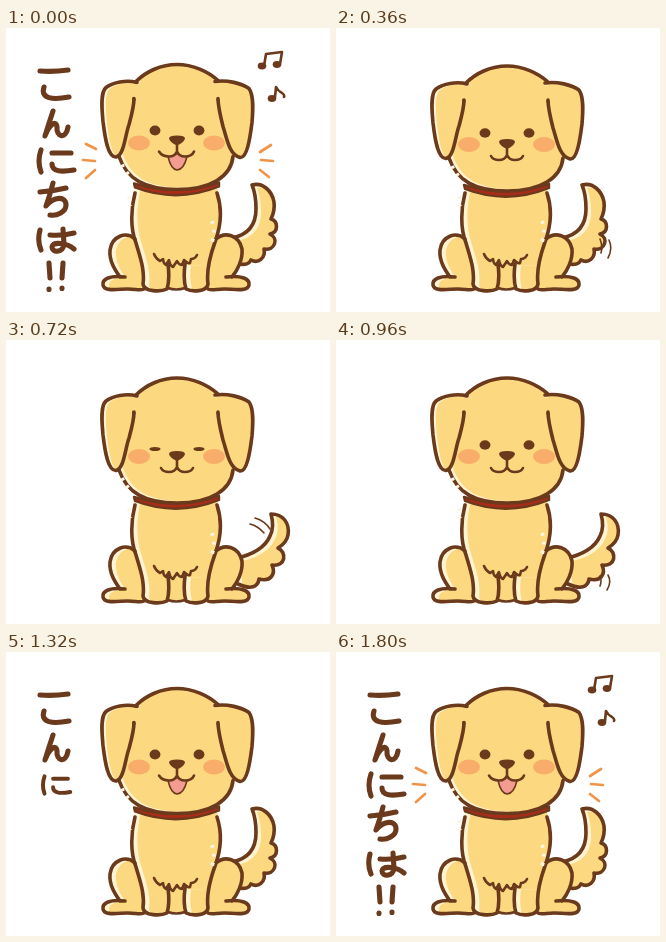
An HTML page for the animation above (1920 ms loop, 324x284 px).

```html
<!DOCTYPE html>
<html lang="ja">
<head>
<meta charset="utf-8">
<title>こんにちは</title>
<style>
html, body { margin: 0; width: 100%; height: 100%; overflow: hidden; background: #fff; }
svg { display: block; width: 100vw; height: 100vh; }
.ink { fill: none; stroke: #6b3a1c; stroke-width: 3.6; stroke-linecap: round; stroke-linejoin: round; }
.thin { stroke-width: 1.6; }
.mouth { stroke-width: 2.6; }
.letter { stroke-width: 5.1; }
.dot { fill: #6b3a1c; }
.cheek { fill: #f8ae6a; }
.gap { fill: none; stroke: #fff6df; stroke-width: 3.8; stroke-dasharray: 3 6; }
.ray { fill: none; stroke: #f0944a; stroke-width: 2.7; stroke-linecap: round; }
</style>
</head>
<body>
<svg id="stage" viewBox="0 0 324 284">
  <defs>
    <filter id="rough" filterUnits="userSpaceOnUse" x="0" y="0" width="324" height="284" color-interpolation-filters="sRGB">
      <feTurbulence type="fractalNoise" baseFrequency="0.25" numOctaves="1" seed="4"/>
      <feDisplacementMap in="SourceGraphic" scale="1.5" xChannelSelector="R" yChannelSelector="G"/>
    </filter>
  </defs>
  <g id="art" filter="url(#rough)"></g>
</svg>
<script>
const NS = 'http://www.w3.org/2000/svg';
const STEP = 120, STEPS = 16;
const art = document.getElementById('art');
const defs = document.querySelector('defs');
let clips = 0;

function add(parent, tag, attrs = {}) {
  const el = document.createElementNS(NS, tag);
  for (const key in attrs) el.setAttribute(key, attrs[key]);
  parent.appendChild(el);
  return el;
}
const group = (parent = art) => add(parent, 'g');
const line = (parent, d, cls = 'ink') => add(parent, 'path', { d, class: cls });
const oval = (parent, cx, cy, rx, ry, cls = 'dot') => add(parent, 'ellipse', { cx, cy, rx, ry, class: cls });
const show = (el, on) => el.setAttribute('display', on ? 'inline' : 'none');

// Yellow area, slid right so a pale rim stays on its left side
function fur(parent, d, dx = 4, dy = 1) {
  const id = 'clip' + clips++;
  add(add(defs, 'clipPath', { id }), 'path', { d });
  add(parent, 'path', { d, fill: '#fff3d2' });
  const inner = add(parent, 'g', { 'clip-path': `url(#${id})` });
  add(inner, 'path', { d, fill: '#fcd980', transform: `translate(${dx} ${dy})` });
}

// Tail
const tailUp = 'M226 210C241 207 250 198 250 181C250 172 249 164 246 157C257 154 266 163 268 174C269 182 267 187 265 191C272 193 273 204 264 206C273 210 269 223 258 221C260 230 252 236 245 232C243 236 240 237 232 236';
const tailOut = 'M228 219C246 215 259 208 264 196C268 188 267 181 265 174C277 174 284 183 282 195C281 201 277 205 272 208C281 212 280 227 266 225C270 234 265 242 253 239C252 247 245 250 232 244';
function tail(d, turn = 0) {
  const g = group();
  fur(g, d, 5, 3);
  line(g, d);
  if (turn) g.setAttribute('transform', `rotate(${turn} 232 230)`);
  return g;
}
const tails = [tail(tailUp), tail(tailOut), tail(tailOut, 17)];

const swishes = {
  up: 'M264 211Q267 218 265 225M273 212Q277 221 272 230',
  out: 'M244 184Q252 186 258 193M249 178Q259 181 264 189',
  back: 'M264 236Q266 241 264 246M272 235Q276 242 271 250'
};
for (const key in swishes) swishes[key] = line(art, swishes[key], 'ink thin');

// Body
const body = group();
fur(body, 'M129 212C120 203 106 208 104 222C103 233 109 242 114 249C102 248 96 252 97 258C98 264 112 261 122 261C130 261 136 263 142 261L140 225Z', 6, 1);
fur(body, 'M209 212C219 203 233 207 236 221C237 232 231 243 226 249C238 248 244 252 243 257C242 264 228 261 218 261C210 261 204 263 198 261L202 225Z', 0, 1);
fur(body, 'M129 160C124 180 124 200 130 217C134 230 139 244 137 257C138 265 156 264 162 260L179 260C185 264 199 265 202 257C201 244 205 230 209 217C215 198 215 180 211 160Z', 6, 0);
fur(body, 'M179 237Q177 252 180 261C186 264 200 264 201 256L201 238Z', 6, 0);
line(body, 'M129 211C120 203 106 208 104 222C103 233 109 242 114 249M119 249C104 247 96 251 97 257C98 264 112 261 122 261C130 261 134 263 138 261');
line(body, 'M210 211C219 203 233 207 236 221C237 232 231 243 226 249M220 249C236 247 244 251 243 257C242 264 228 261 218 261C210 261 206 263 202 261');
line(body, 'M129 165C125 180 124 200 130 215C134 229 139 242 137 256C138 264 155 264 161 261Q164 252 162 236');
line(body, 'M211 165C216 180 215 198 209 214C204 228 200 242 202 256C201 264 186 264 180 261Q177 252 179 236');
line(body, 'M162 260Q170 263 179 260', 'ink mouth');
line(body, 'M148 226Q150 231 154 233L157 231Q157 235 160 237L163 232Q164 238 167 239L171 233Q173 237 176 237L178 232Q182 236 184 235L185 231Q189 231 191 227', 'ink mouth');
line(body, 'M206 193Q210 202 206 214M123 168L124 178', 'gap');

// Head
const head = group();
line(head, 'M128 157Q171 170 213 156L213 160Q171 177 129 161Z').setAttribute('style', 'fill:#a82c1a;stroke-width:2.4');
fur(head, 'M130 55C140 45 155 38 171 38C187 38 202 45 212 54L228 128C226 150 205 163 171 163C139 163 121 153 113 130Z', 4, -2);
line(head, 'M130 55C140 45 155 38 171 38C187 38 202 45 212 54M113 130C121 153 139 163 171 163C205 163 225 150 227 130');
line(head, 'M116 138Q119 145 126 152', 'gap');
const ears = [
  'M131 56C120 53 107 56 100 61C94 66 96 84 97 95C99 112 102 131 110 130.500C118 129 119 109 123 98C126 87 128 80 128 72',
  'M209 55C221 53 236 57 243 62C248 69 247 84 246 96C244 112 241 132 234 131C223 128 221 112 217 100C214 88 212 80 212 72'
];
ears.forEach((d, i) => {
  fur(head, d, i ? 1 : 4, 1);
  line(head, d);
});
// Covers the pale seam where each ear joins the head
add(head, 'path', { d: 'M127 58L136 58L136 73L127 73ZM206 58L214 58L214 73L206 73Z', fill: '#fcd980' });
line(head, 'M128 73L128 72M212 73L212 72');
oval(head, 133, 116.5, 11, 7.5, 'cheek');
oval(head, 208, 116.5, 11, 7.5, 'cheek');

function nose(parent, y) {
  add(parent, 'path', {
    d: 'M163 -2Q163 -5 171 -5Q179 -5 179 -2Q178 2 171 5Q164 2 163 -2Z',
    class: 'dot', transform: `translate(0 ${y})`
  });
}
function eyes(parent, y, rx, ry) {
  const g = group(parent);
  oval(g, 149, y, rx, ry);
  oval(g, 193, y, rx, ry);
  return g;
}
const calm = group(head);
nose(calm, 116);
line(calm, 'M171 120L171 127Q169 132 163 132Q157 132 155 128M171 127Q173 132 179 132Q185 132 187 128', 'ink mouth');
const open = eyes(calm, 105, 5.5, 4.7);
const shut = eyes(calm, 109, 5.6, 2.1);

const glad = group(head);
add(glad, 'path', { d: 'M162 130Q165 143 171 143.500Q178 143 181 130Q175 130 171 126Q168 130 162 130Z', fill: '#f39c92' });
line(glad, 'M162 130Q165 143 171 143.500Q178 143 181 130', 'ink thin');
line(glad, 'M171 118L171 125Q169 130 163 130Q156 130 153 125M171 125Q173 130 179 130Q186 130 188 125', 'ink mouth');
nose(glad, 114);
eyes(glad, 104, 5.4, 5);

// Hand lettering
const letters = group();
letters.setAttribute('role', 'img');
letters.setAttribute('aria-label', 'こんにちは!!');
const glyphs = [
  ['M34 43Q48 44 62 42M38 59C34 71 47 72 63 69', 56],
  ['M47 83Q43 95 39 108C43 97 50 91 51 99C50 109 60 112 62 99', 96],
  ['M35 122Q31 133 35 144M46 125L65 125M46 136C46 144 56 144 68 142', 133],
  ['M34 164Q48 163 60 160M47 155Q44 167 40 178C48 168 60 168 60 177C60 184 51 188 44 187', 171],
  ['M34 202Q31 213 35 222M44 207Q56 208 68 205M57 201L58 216C57 225 46 225 46 219C47 213 61 215 68 221', 213],
  ['M43 235L44 250M57 235L56 250M43 261L43 261.500M56 260L56 260.500', 247]
].map(([d, y]) => ({ el: line(letters, d, 'ink letter'), x: 51, y }));

// Notes and rays
function note(d, heads, x, y) {
  const el = group();
  line(el, d, 'ink mouth');
  heads.forEach(([cx, cy]) => oval(el, cx, cy, 4.3, 3.4));
  return { el, x, y };
}
const pair = note('M258 38L260 26L276 24L274 36', [[256, 38], [271, 36.5]], 266, 32);
const single = note('M269 69L270 59Q272 63 276 65Q279 67 278 69', [[266, 70.5]], 271, 66);
const rays = line(art, 'M80 116L90 121M77 132L89 133M80 150L89 142M254 124L265 117M255 132L267 133M254 142L263 149', 'ray');

// Each item pops in small, then takes full size one step later
function pop(item, age, small, dx = 0, dy = 0) {
  const { el, x, y } = item;
  show(el, age >= 0);
  el.setAttribute('transform', age === 0
    ? `translate(${x + dx} ${y + dy}) scale(${small}) translate(${-x} ${-y})` : '');
}

const wag = '0120001210000000';
const swishAt = { 1: 'out', 3: 'up', 6: 'out', 8: 'back', 9: 'up' };

function draw(ms) {
  const k = Math.floor(ms / STEP) % STEPS;
  const age = k || STEPS;
  const happy = age >= 9;
  tails.forEach((el, i) => show(el, i === +wag[k]));
  for (const key in swishes) show(swishes[key], swishAt[k] === key);
  head.setAttribute('transform', happy ? 'translate(0 -1.5)' : '');
  show(glad, happy);
  show(calm, !happy);
  show(open, k !== 6);
  show(shut, k === 6);
  glyphs.forEach((g, i) => pop(g, age - 9 - i, 0.78));
  pop(pair, age - 13, 0.65, 3, 20);
  pop(single, age - 14, 0.65, 0, 6);
  show(rays, age >= 15);
}

const start = performance.now();
function tick() {
  draw(performance.now() - start);
  requestAnimationFrame(tick);
}
tick();
</script>
</body>
</html>
```
